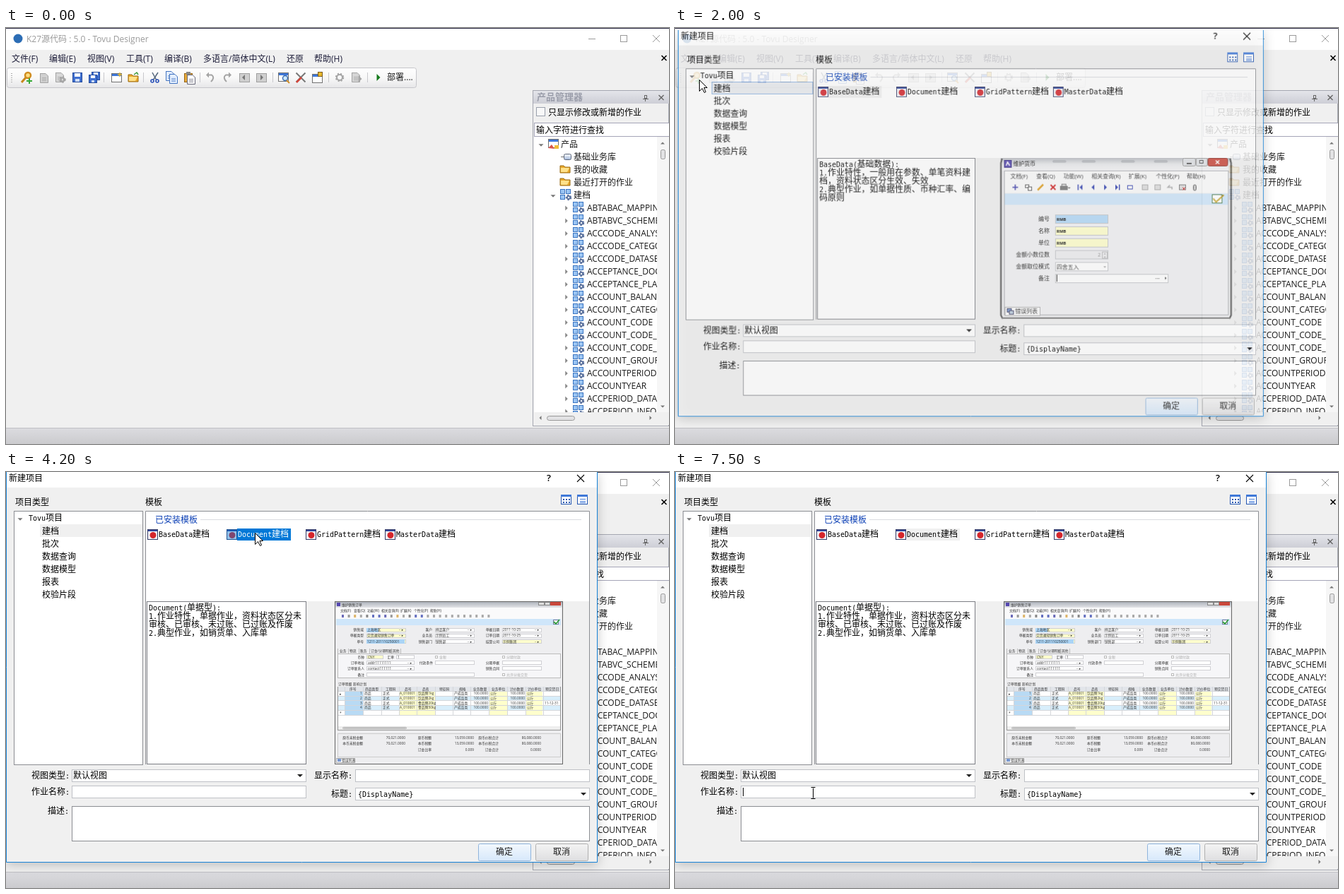
An HTML page with a canvas that plays this animation: 938x589 px, repeating every 8 s.

```html
<!DOCTYPE html>
<html lang="zh">
<head>
<meta charset="utf-8">
<style>
html, body { margin: 0; width: 100%; height: 100%; overflow: hidden; background: #f0f0f0; }
canvas { display: block; }
</style>
</head>
<body>
<canvas id="stage" width="938" height="589"></canvas>
<script>
const W = 938, H = 589, LOOP = 8000, STEP = 100;
const CJK = '"Noto Sans CJK SC", "Noto Sans CJK", sans-serif';
const screen = document.getElementById('stage').getContext('2d');
const layer = Object.assign(document.createElement('canvas'), { width: W, height: H });
const dialog = layer.getContext('2d');
let g = screen;

// ---- drawing helpers (y of text is the middle of the line) ----
function box(x, y, w, h, fill, stroke) {
  if (fill) { g.fillStyle = fill; g.fillRect(x, y, w, h); }
  if (stroke) { g.strokeStyle = stroke; g.lineWidth = 1; g.strokeRect(x + .5, y + .5, w - 1, h - 1); }
}
function shade(y, h, ...colors) {
  const fill = g.createLinearGradient(0, y, 0, y + h);
  colors.forEach((c, i) => fill.addColorStop(i / (colors.length - 1), c));
  return fill;
}
function path(points, stroke, width = 1, fill) {
  g.beginPath();
  for (let i = 0; i < points.length; i += 2) g.lineTo(points[i], points[i + 1]);
  if (fill) { g.closePath(); g.fillStyle = fill; g.fill(); }
  if (stroke) { g.strokeStyle = stroke; g.lineWidth = width; g.stroke(); }
}
function disc(x, y, r, fill, stroke, width = 1) {
  g.beginPath();
  g.arc(x, y, r, 0, 7);
  if (fill) { g.fillStyle = fill; g.fill(); }
  if (stroke) { g.strokeStyle = stroke; g.lineWidth = width; g.stroke(); }
}
function pill(x, y, w, h, r, fill, stroke) {
  g.beginPath();
  g.roundRect(x + .5, y + .5, w - 1, h - 1, r);
  g.fillStyle = fill; g.fill();
  g.strokeStyle = stroke; g.lineWidth = 1; g.stroke();
}
function ui(s, x, y, color = '#1a1a1a', size = 12, weight = '') {
  g.font = `${weight} ${size}px "Open Sans", ${CJK}`;
  g.fillStyle = color;
  g.fillText(s, x, y + size / 3);
}
function small(s, x, y, size = 8, color = '#333', align = 'left') {
  g.textAlign = align;
  ui(s, x, y, color, size);
  g.textAlign = 'left';
}
// Half-width characters take 6 px, full-width ones 12 px.
function mono(s, x, y, color = '#000') {
  g.fillStyle = color;
  for (const run of s.match(/[\x20-\xff]+|[^\x20-\xff]+/g)) {
    const latin = run.charCodeAt(0) < 256;
    g.font = latin ? '10px "DejaVu Sans Mono", monospace' : `12px ${CJK}`;
    g.fillText(run, x, y + 4);
    x += run.length * (latin ? 6 : 12);
  }
}
function dotted(x, y, w, h, color) {
  g.setLineDash([1, 1]);
  box(x, y, w, h, null, color);
  g.setLineDash([]);
}
const cross = (x, y, r, color, width = 1) => {
  path([x - r, y - r, x + r, y + r], color, width);
  path([x - r, y + r, x + r, y - r], color, width);
};
const plus = (x, y, r, color, width) => {
  path([x - r, y, x + r, y], color, width);
  path([x, y - r, x, y + r], color, width);
};
const down = (x, y, color = '#222', r = 4) => path([x - r, y - r / 2, x + r, y - r / 2, x, y + r / 2], null, 1, color);
const up = (x, y, color, r = 3) => path([x - r, y + r / 2, x + r, y + r / 2, x, y - r / 2], null, 1, color);
const right = (x, y, color, r = 4) => path([x - r / 2, y - r, x + r / 2, y, x - r / 2, y + r], null, 1, color);
const left = (x, y, color, r = 4) => path([x + r / 2, y - r, x - r / 2, y, x + r / 2, y + r], null, 1, color);

// ---- icons, placed by their centre ----
function page(x, y, fill, stroke) {
  path([x - 5.5, y - 6.5, x + 2, y - 6.5, x + 5.5, y - 3, x + 5.5, y + 6.5, x - 5.5, y + 6.5, x - 5.5, y - 7], stroke, 1, fill);
  for (let i = -1; i < 4; i += 2) path([x - 3, y + i + .5, x + 3, y + i + .5], stroke, .7);
}
function disk(x, y, r = 7) {
  box(x - r, y - r, 2 * r, 2 * r, '#3f6fd0', '#234a9c');
  box(x - r + 3, y - r + 1, 2 * r - 6, r - 2, '#f4f8ff');
  box(x - r + 4, y + 2, 2 * r - 8, r - 3, '#cddcf5');
}
function folder(x, y) {
  path([x - 7, y - 5, x - 2, y - 5, x, y - 3, x + 7, y - 3, x + 7, y + 5, x - 7, y + 5, x - 7, y - 5], '#9a6a12', 1, '#e9a92c');
  path([x - 6, y - 2, x + 6, y - 2, x + 3, y + 4, x - 6, y + 4], null, 1, '#ffe18a');
}
function windowIcon(x, y) {
  box(x - 7, y - 6, 15, 13, '#fff', '#707070');
  box(x - 6, y - 5, 13, 3, '#3d76d8');
}
function gear(x, y, color, r = 5) {
  g.setLineDash([2, 2]);
  disc(x, y, r, null, color, 2.5);
  g.setLineDash([]);
  disc(x, y, r - 1, null, color, 2);
}
function moduleIcon(x, y) {
  for (const [dx, dy] of [[-8, -8], [0, -8], [-8, 0]]) box(x + dx, y + dy, 7, 7, '#9cc6f4', '#3973c0');
  gear(x + 4, y + 4, '#59709c', 3);
  disc(x + 4, y + 4, 1.2, '#fff');
}
// A bent arrow: up from below, over the top, with its head on the given side.
function curl(x, y, side) {
  g.save();
  g.translate(x, y);
  g.scale(side, 1);
  g.beginPath();
  g.moveTo(-1, 6); g.quadraticCurveTo(-7, 0, -2, -3.5); g.lineTo(3, -3.5);
  g.strokeStyle = '#a4a4a4'; g.lineWidth = 2; g.stroke();
  right(4, -3.5, '#a4a4a4');
  g.restore();
}

function toolbar(hover) {
  pill(1, 56, 580, 29, 3, shade(56, 29, '#ffffff', '#f8f8f8', '#e6e6e8'), '#c6c6ca');
  for (let y = 64; y < 78; y += 3) box(7, y, 2, 1, '#b0b0b0');
  for (const x of [138, 194, 274, 377, 456, 511]) box(x, 63, 1, 14, '#c8c8cc');
  if (hover) box(19, 60, 21, 21, '#f0f0f2');
  path([29, 69, 22, 77], '#c8881c', 3);
  disc(31, 67, 4, '#ffdf80', '#d08c20', 2.5);
  plus(33, 75, 4, '#35a935', 2);
  page(54, 71, '#d0d0d0', '#a2a2a2');
  page(76, 70, '#d8d8d8', '#a2a2a2');
  gear(80, 73, '#a6a6a6', 3.5);
  disk(101, 70);
  disk(127, 68, 6); disk(123, 72, 6);
  windowIcon(156, 70); plus(161, 66, 3, '#e9b92c', 1.5);
  folder(180, 71); path([181, 66, 185, 63, 187, 66], '#3c9a3c', 1.5);
  path([207, 63, 213, 74], '#56687e', 1.5); path([215, 63, 208, 74], '#56687e', 1.5);
  disc(207, 75, 2, null, '#2850b8', 1.6); disc(214, 75, 2, null, '#2850b8', 1.6);
  page(232, 68, '#e4efff', '#4474c0'); page(237, 72, '#e4efff', '#4474c0');
  box(252, 64, 12, 13, '#e7aa3a', '#95651a'); box(255, 62, 6, 4, '#888'); page(262, 73, '#fff', '#667');
  curl(289, 70, -1); curl(313, 70, 1);
  for (const x of [337, 361]) box(x - 7, 64, 15, 13, '#cfcfcf', '#a0a0a0');
  left(336, 70, '#777'); right(362, 70, '#777');
  windowIcon(392, 69); disc(395, 71, 3.5, '#cce8ff', '#3f6fb0', 1.5); path([397, 74, 401, 78], '#d28f28', 2);
  cross(417, 70, 6.5, '#777', 2); path([411, 77, 418, 70], '#d5453a', 2.5);
  windowIcon(440, 71); box(441, 62, 7, 7, '#e9b92c', '#7a5a20');
  gear(472, 70, '#a6a6a6'); page(495, 70, '#d5d5d5', '#a2a2a2'); right(501, 72, '#a6a6a6', 5);
  right(527, 70, '#157a1c', 5);
  ui('部署....', 539, 70);
}

const modules = ['ABTABAC_MAPPING', 'ABTABVC_SCHEME', 'ACCCODE_ANALYSIS', 'ACCCODE_CATEGORY', 'ACCCODE_DATASET',
  'ACCEPTANCE_DOC', 'ACCEPTANCE_PLAN', 'ACCOUNT_BALANCE', 'ACCOUNT_CATEGORY', 'ACCOUNT_CODE', 'ACCOUNT_CODE_',
  'ACCOUNT_CODE_', 'ACCOUNT_GROUP', 'ACCOUNTPERIOD', 'ACCOUNTYEAR', 'ACCPERIOD_DATA', 'ACCPERIOD_INFO'];

function productPanel(active) {
  box(745, 88, 193, 476, '#f0f0f0', '#a4a6b0');
  box(746, 89, 192, 18, shade(89, 18, '#e4e5ea', '#cdced6'));
  ui('产品管理器', 751, 98, active ? '#5c6070' : '#9a9daa', 13, 'bold');
  box(903, 95, 4, 5, null, '#666'); box(901, 100, 8, 1, '#666'); box(904, 101, 1, 3, '#666');
  cross(927, 98.5, 3.5, '#666', 1.4);
  box(750, 112, 13, 13, '#f8f8f8', '#9aa0ac');
  ui('只显示修改或新增的作业', 767, 120, '#000');
  if (active) dotted(766, 111, 134, 17, '#000');
  box(747, 134, 192, 20, '#fff', '#a5a5b8');
  ui('输入字符进行查找', 750, 145, '#000');
  box(747, 154, 191, 408, '#f0f0f0');
  box(747, 154, 174, 390, '#fff');
  g.save();
  g.beginPath(); g.rect(747, 154, 174, 390); g.clip();
  down(757, 166, '#777', 3.5);
  windowIcon(774, 163); path([767, 170, 772, 165, 776, 171], null, 1, '#d9534a'); box(776, 166, 6, 5, '#f0bb38');
  ui('产品', 785, 165);
  box(785, 182, 5, 1, '#777'); pill(789, 178, 11, 9, 2, shade(178, 9, '#fff', '#9db4d8'), '#5a6478');
  ui('基础业务库', 803, 183);
  folder(791, 200); ui('我的收藏', 803, 201);
  folder(791, 218); ui('最近打开的作业', 803, 219);
  down(774, 238, '#777', 3.5); moduleIcon(792, 236); ui('建档', 803, 237);
  modules.forEach((name, i) => {
    const y = 255 + 18 * i;
    right(793, y, '#888', 3.5);
    moduleIcon(810, y - 1);
    ui(name, 822, y);
  });
  g.restore();
  box(921, 155, 17, 389, '#f6f6f6'); up(929, 163, '#777'); down(929, 536, '#777', 3);
  pill(926, 172, 7, 14, 2, '#e2e2e4', '#999');
  left(756, 552, '#777', 3); right(912, 552, '#777', 3);
  pill(765, 549, 40, 7, 3, '#e2e2e4', '#999');
}

const menus = [['文件(F)', 8], ['编辑(E)', 61], ['视图(V)', 115], ['工具(T)', 170], ['编译(B)', 224],
  ['多语言/简体中文(L)', 279], ['还原', 397], ['帮助(H)', 436]];

function mainWindow(active, hover) {
  const ink = active ? '#000' : '#9a9a9a';
  box(0, 0, W, H, '#f0f0f0');
  box(0, 0, W, 31, '#fff');
  box(0, 0, W, 1, active ? '#1883d7' : '#2d2b45');
  disc(17, 15, 6.5, '#2c6db5');
  ui('K27源代码 : 5.0 - Tovu Designer', 29, 16, ink);
  box(824, 15, 10, 1, ink); box(869, 10, 10, 10, null, ink); cross(920, 15, 5, ink);
  for (const [label, x] of menus) ui(label, x, 44, '#1e1e3a');
  cross(931, 42.5, 3.5, '#000', 1.6);
  toolbar(hover);
  productPanel(active);
  box(0, 566, W, 23, shade(566, 23, '#dcdce0', '#cbcbce'));
  box(0, 566, W, 1, '#c0c0c4');
}

// ---- previews inside the dialog ----
function currencyPreview() {
  box(461, 183, 330, 230, '#ececee');
  box(461, 183, 330, 18, shade(183, 18, '#b9bcc2', '#e9eaec', '#f4f4f6'));
  path([463, 184, 461.5, 190, 461.5, 408, 464, 413], '#444', 2);
  path([789, 184, 790.5, 190, 790.5, 408, 788, 413], '#444', 2);
  box(463, 411, 326, 2, '#777');
  for (const x of [535, 577, 633, 680]) pill(x, 186, 20, 4, 2, 'rgba(90,94,102,.25)', 'rgba(90,94,102,.1)');
  box(466, 186, 11, 11, '#5547b0', '#332a80'); path([469, 194, 471, 189, 474, 194], '#fff', 1.5);
  small('维护货币', 479, 191.5, 8, '#111');
  pill(721, 183, 19, 12, 2, '#dfe1e5', '#999'); box(727, 190, 7, 2, '#555');
  pill(740, 183, 17, 12, 2, '#dfe1e5', '#999'); box(745, 186, 6, 5, null, '#555');
  pill(757, 183, 29, 12, 2, '#c9473b', '#8d3028'); cross(771, 189, 2.5, '#fff', 1.5);
  box(466, 201, 321, 207, '#f1f1f3', '#a9abb0');
  box(467, 202, 319, 31, '#fafafb');
  [['文档(F)', 475], ['查看(Q)', 512], ['功能(W)', 551], ['相关查询(R)', 591], ['扩展(K)', 644], ['个性化(P)', 683], ['帮助(H)', 727]]
    .forEach(([label, x]) => small(label, x, 209));
  plus(482, 225, 4, '#3a3aa8', 1.5);
  box(496, 221, 6, 5, null, '#555'); box(500, 224, 6, 6, '#fff', '#555');
  path([514, 229, 522, 221], '#e0a020', 2.5); cross(536, 225, 3.5, '#d02020', 1.8);
  box(546, 223, 11, 6, '#777'); box(548, 220, 7, 4, '#ddd', '#777'); down(559, 226, '#555', 2);
  box(571, 221, 1.5, 8, '#3040b0'); left(576, 225, '#3040b0'); left(593, 225, '#3040b0');
  right(611, 225, '#3040b0'); right(627, 225, '#3040b0'); box(630, 221, 1.5, 8, '#3040b0');
  box(642, 222, 8, 6, null, '#3040b0');
  for (const x of [663, 681]) box(x, 221, 9, 8, '#ddd', '#aaa');
  path([706, 228, 706, 225, 700, 225, 703, 222], '#aaa', 1.5);
  box(716, 221, 10, 8, '#ddd', '#777'); cross(723, 227, 2, '#d02020'); pill(736, 221, 5, 9, 2, '#ccc', '#555');
  box(467, 234, 319, 16, '#cfe6fa'); box(763, 235, 15, 13, '#fff', '#447744');
  path([765, 241, 769, 246, 780, 236], '#c6a52c', 2);
  const labels = ['编号', '名称', '单位', '金额小数位数', '金额取位模式', '备注'];
  const fills = ['#b4daf8', '#ffffcc', '#ffffcc', '#ededf0', '#fff', '#fff'];
  labels.forEach((label, i) => {
    const y = 270.5 + i * 17;
    small(label, 531, y, 8, '#222', 'right');
    box(539, Math.round(y) - 7, i === 5 ? 162 : 76, 13, fills[i], '#c4c6ca');
    if (i < 3) ui('RMB', 541, y, '#111', 6, 'bold');
  });
  small('2', 600, 322, 7, '#888'); box(606, 317, 8, 10, null, '#bbb'); up(610, 320, '#999', 1.5); down(610, 325, '#999', 1.5);
  small('四舍五入', 541, 339); down(610, 339, '#999', 2);
  box(541, 350, 1, 10, '#222'); small('···', 682, 355, 8, '#000'); right(697, 355, '#333', 2);
  box(467, 396, 51, 13, '#fafafa', '#b0b0b0'); box(470, 398, 7, 6, '#7898d0', '#446'); box(473, 401, 7, 6, '#bcd', '#446');
  small('错误列表', 482, 402.5);
}

function orderPreview() {
  const tiny = (s, x, y, align) => small(s, x, y, 4.8, '#333', align);
  const row = (items, y, align) => items.forEach(([s, x]) => tiny(s, x, y, align));
  const field = (x, y, w, fill = '#fff') => box(x, y, w, 6, fill, '#d0d0d4');
  box(465, 183, 323, 231, '#eeeef0', '#666');
  box(466, 184, 321, 8, shade(184, 8, '#aeb3bc', '#e3e4e8'));
  box(468, 185, 5, 5, '#5547b0'); tiny('维护销售订单', 475, 188);
  box(753, 184, 9, 5, '#ddd', '#888'); box(762, 184, 8, 5, '#ddd', '#888'); box(770, 184, 15, 5, '#c9473b');
  box(467, 192, 318, 16, '#fafafb');
  row([['文档(F)', 473], ['查看(Q)', 492], ['功能(W)', 511], ['相关查询(R)', 531], ['扩展(K)', 558], ['个性化(P)', 577], ['帮助(H)', 600]], 196);
  const toolInk = ['#6a6ab8', '#999', '#ddb468', '#aaa', '#888', '#6470c0', '#6470c0'];
  for (let i = 0; i < 25; i++) box(475 + i * 8.6, 202, 3, 4, i < 14 ? toolInk[i % 7] : '#aaa');
  box(467, 208, 318, 9, '#cfe6fa'); box(774, 209, 8, 7, '#fff', '#779'); path([775, 212, 778, 215, 783, 209], '#2f9e3c', 1.8);

  const fields = [['销售域', '客户', '单据日期'], ['单据类型', '业务员', '订单日期'], ['单号', '销售部门', '结算公司']];
  const values = [['上海地区', '样品客户', '2011-10-25'], ['交货通知销售订单', '示例员工', '2011-10-25'], ['1211-201110250001', '销售部', '示例集团']];
  fields.forEach((names, r) => names.forEach((name, c) => {
    const x = [510, 607, 702][c], y = 223.5 + r * 8.3, top = Math.round(y) - 3;
    tiny(name, x - 4, y, 'right');
    field(x, top, 56, c === 0 || r === 2 && c === 2 ? '#ffffcc' : '#fff');
    if (c === 0 && r !== 1) box(x, top, r ? 54 : 17, 6, '#aad4f6');
    tiny(values[r][c], x + 1, y);
    if (c || r < 2) tiny('·· ▸', x + 46, y);
  }));
  row([['业务', 472], ['物流', 486], ['账务', 501], ['订金/分期明细', 516], ['其他', 547]], 253);
  for (const x of [469, 484, 499, 514, 545, 558]) box(x, 250, 1, 7, '#bbb');
  box(469, 257, 316, 35, '#f6f6f8', '#bbb');
  row([['币种', 507], ['汇率', 549]], 262, 'right');
  row([['订单地址', 507], ['付款条件', 604], ['分期单据', 698]], 270, 'right');
  row([['订单联系人', 507], ['销售合同', 698]], 278, 'right');
  row([['备注', 507]], 287, 'right');
  field(510, 259, 24, '#ffffcc'); field(552, 259, 26);
  tiny('CNY', 512, 262); tiny('1', 554, 262);
  for (const y of [267, 275]) { field(510, y, 68); field(702, y, 56); tiny('·· ▸', 568, y + 3); }
  tiny('addr11111111', 512, 270); tiny('contact111111', 512, 278);
  field(510, 284, 153); field(607, 267, 56);
  for (const [s, x, y] of [['含税', 607, 262], ['分期付款', 702, 262], ['允许分批交货', 702, 287]]) {
    box(x, y - 2, 4, 4, '#fff', '#bbb'); small(s, x + 6, y, 5, '#aaa');
  }
  row([['订单明细', 470], ['影响计划', 491]], 300.5);
  box(469, 304, 316, 62, '#fff', '#999');
  box(470, 304, 314, 6, '#e2e5ea');
  for (const y of [317, 330]) box(470, y, 314, 7, '#d8eefb');
  for (const [x, w] of [[556, 51], [683, 26], [735, 24]]) box(x, 310, w, 34, '#ffffcc');
  box(480, 310, 25, 34, '#b8daf4');
  for (const x of [479, 505, 531, 556, 581, 607, 632, 657, 683, 709, 735, 760]) box(x, 304, 1, 40, '#d4d6da');
  for (const y of [310, 317, 323, 330, 337, 344]) box(470, y, 314, 1, '#d4d6da');
  row([['序号', 486], ['商品类型', 508], ['工程码', 537], ['品号', 564], ['品名', 589], ['特征码', 613], ['规格', 641],
    ['业务数量', 661], ['业务单位', 687], ['计价数量', 713], ['计价单位', 738], ['预交货日', 763]], 307);
  ['饮品牌1kg', '饮品牌2kg', '食品牌20kg', '食品牌50kg'].forEach((name, i) => {
    const y = 313.5 + i * 6.7;
    row([[i + 1, 501], ['商品', 507], ['正式', 533], ['A_010001', 557], [name, 583], ['产成品类', 634],
      ['公斤', 685], ['公斤', 737], [i === 2 ? '11-12-31' : '', 762]], y);
    row([['100.0000', 682], ['100.0000', 734]], y, 'right');
  });
  tiny('▸', 472, 314); tiny('*', 472, 341);
  box(470, 360, 314, 5, '#eee'); pill(476, 361, 91, 3, 1, '#ddd', '#aaa');
  box(469, 370, 316, 34, null, '#ccc');
  [['币未税金额', 505, '70,021.0000', 565], ['币税额', 602, '13,059.0000', 662], ['币价税合计', 697, '80,080.0000', 757]]
    .forEach(([s, x, n, end]) => ['原', '本'].forEach((kind, i) => row([[kind + s, x], [n, end]], 376 + 8 * i, 'right')));
  row([['订金比率', 602], ['0.009', 662], ['订金合计', 697], ['0.0000', 757]], 393, 'right');
  box(467, 405, 27, 7, '#fafafa', '#aaa'); box(469, 406, 5, 4, '#7898d0'); tiny('错误列表', 475, 408.5);
}

const notes = {
  base: ['BaseData(基础数据):', '1.作业特性，一般用在参数、单笔资料建', '档，资料状态区分生效、失效', '2.典型作业，如单据性质、币种汇率、编', '码原则'],
  document: ['Document(单据型):', '1.作业特性，单据作业，资料状态区分未', '审核、已审核、未过账、已过账及作废', '2.典型作业，如销货单、入库单']
};

function button(x, label, focused) {
  const [top, bottom, edge] = focused ? ['#f3f8fd', '#d6e8fb', '#8fb4dc'] : ['#f4f4f4', '#dedee0', '#b0b0b0'];
  pill(x, 526, 75, 25, 2, shade(526, 25, top, bottom), edge);
  ui(label, x + 25, 538);
}

function projectDialog(t) {
  const picked = t >= 4100, editing = t >= 5500;
  box(0, 0, 837, 553, '#f0f0f0');
  box(0, 0, 837, 22, '#fff');
  path([.5, 0, .5, 552.5, 836.5, 552.5, 836.5, 0], '#1883d7');
  ui('新建项目', 4, 9, '#000');
  ui('?', 765, 9, '#000', 13, '600');
  cross(813, 9, 5, '#000', 1.1);
  mono('项目类型', 13, 43); mono('模板', 197, 43);
  for (const x of [785, 808]) { box(x, 32, 15, 14, '#fff', '#2456b0'); box(x, 32, 15, 3, '#3f78d8'); }
  for (let i = 0; i < 6; i++) box(788 + i % 3 * 4, 38 + (i / 3 | 0) * 4, 2, 2, '#2456b0');
  for (const y of [38, 41, 43]) box(812, y, 8, 1, '#3f78d8');

  box(11, 55, 183, 360, '#fff', '#8b8d92');
  down(20, 67, '#777', 3.5);
  mono('Tovu项目', 32, 65);
  box(48, 74, 145, 18, picked ? '#f0f0f0' : '#eaecf0');
  if (!picked) dotted(48, 74, 145, 18, '#2f7ad0');
  ['建档', '批次', '数据查询', '数据模型', '报表', '校验片段'].forEach((s, i) => mono(s, 51, 83.5 + 18 * i));

  box(197, 55, 629, 128, '#fff');
  path([197.5, 414, 197.5, 55.5, 825.5, 55.5, 825.5, 414], '#8b8d92');
  mono('已安装模板', 211, 68, '#0b3fb5');
  box(275, 67, 539, 1, '#d9dbe0');
  ['BaseData建档', 'Document建档', 'GridPattern建档', 'MasterData建档'].forEach((s, i) => {
    const x = 200 + i * 112, current = i === +picked, hot = current && picked && !editing;
    if (current) box(x + 15, 80, 76, 17, hot ? '#0078d7' : '#f0f0f0');
    box(x, 81, 15, 15, '#f4f4f8', '#333a66');
    box(x + 1, 82, 13, 2, '#32479c');
    disc(x + 8, 89.5, 4.5, '#d5262c');
    if (hot) box(x, 81, 15, 15, 'rgba(0,120,215,.4)');
    mono(s, x + 16, 88, hot ? '#fff' : '#000');
  });

  box(199, 183, 226, 231, '#fff', t >= 4600 && t < 5000 ? '#000' : '#7c7e84');
  notes[picked ? 'document' : 'base'].forEach((s, i) => mono(s, 202, 192 + 12 * i));
  picked ? orderPreview() : currencyPreview();

  for (const [s, x, y] of [['视图类型:', 36, 430], ['作业名称:', 36, 453], ['描述:', 59, 480], ['显示名称:', 436, 430], ['标题:', 460, 456]]) mono(s, x, y);
  for (const [x, y] of [[93, 421], [93, 444], [494, 421], [494, 447]]) box(x, y, 332, 18, '#fff', '#bfc1c6');
  box(93, 473, 733, 50, '#fff', '#8b8d92');
  mono('默认视图', 95, 430); mono('{DisplayName}', 498, 456);
  down(416, 430); down(817, 456);
  button(668, '确定', true); button(749, '取消', false);
  const caretOn = editing && !(t >= 6100 && t < 6600 || t >= 7100 && t < 7500);
  if (caretOn) box(96, 447, 1, 12, '#000');
}

// ---- pointer: time, x, y ----
const route = [[200, 861, 187], [600, 380, 95], [1000, 45, 64], [1500, 34, 73], [2100, 34, 73], [2700, 124, 60],
  [2900, 190, 20], [3200, 283, 136], [3400, 254, 94], [3700, 270, 88], [4100, 352, 86], [4400, 352, 86],
  [4900, 212, 414], [5100, 200, 448], [5300, 198, 453], [5600, 195, 454], [LOOP, 195, 454]];

function pointer(t) {
  if (t < route[0][0]) return;
  const i = route.findIndex(stop => stop[0] > t);
  const [t0, x0, y0] = route[i - 1], [t1, x1, y1] = route[i];
  const k = (t - t0) / (t1 - t0);
  const x = Math.round(x0 + (x1 - x0) * k), y = Math.round(y0 + (y1 - y0) * k);
  g.save();
  g.translate(x + .5, y + .5);
  if (t > 5000) {
    path([0, -7, 0, 7], '#000');
    for (const end of [-8, 8]) path([-3, end, 3, end], '#000');
  } else {
    path([0, 0, 0, 16, 4, 12, 7, 18, 9, 17, 6.5, 11, 11, 11, 0, 0], '#000', 1, '#fff');
  }
  g.restore();
}

function draw(t) {
  g = screen;
  mainWindow(t >= 1400 && t < 1900, t >= 1300 && t < 1900);
  if (t >= 1900) {
    g = dialog;
    g.clearRect(0, 0, W, H);
    projectDialog(t);
    g = screen;
    const [scale, alpha] = t < 2000 ? [.95, .4] : t < 2100 ? [.99, .82] : [1, 1];
    g.save();
    g.globalAlpha = alpha;
    g.shadowColor = 'rgba(0,0,0,.22)'; g.shadowBlur = 16; g.shadowOffsetY = 3;
    g.translate(418.5, 276.5);
    g.scale(scale, scale);
    g.drawImage(layer, -418.5, -276.5);
    g.restore();
  }
  pointer(t);
}

let shown = -1;
function tick() {
  const t = Math.floor(performance.now() % LOOP / STEP) * STEP;
  if (t !== shown) draw(shown = t);
  requestAnimationFrame(tick);
}
tick();
</script>
</body>
</html>
```
